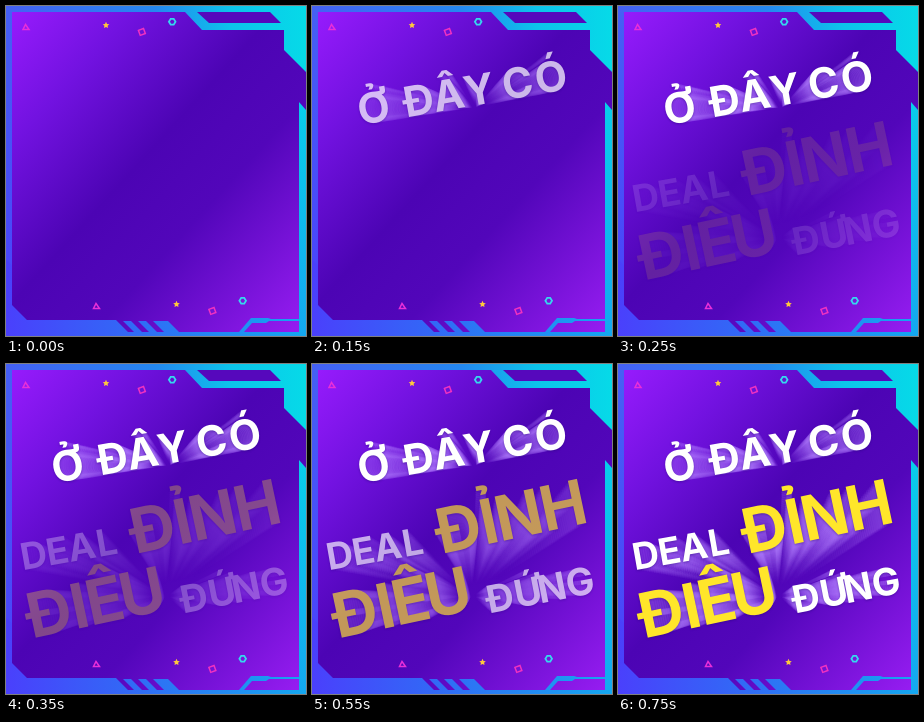
These frames come from a looping animation (300x330 px, 1450 ms). An HTML page:

```html
<!DOCTYPE html>
<html lang="vi">
<head>
<meta charset="utf-8">
<title>Deal</title>
<style>
html, body { margin: 0; width: 100%; height: 100%; overflow: hidden; background: #4a06b4; }
svg { display: block; width: 300px; height: 330px; }
text { font-family: Inter, "Noto Sans", sans-serif; font-weight: 700; text-anchor: middle; }
.face { filter: drop-shadow(0 1px 1px rgba(38, 4, 120, .45)); }
.block { opacity: 0; }
</style>
</head>
<body>
<svg viewBox="0 0 300 330">
  <defs>
    <linearGradient id="bg" x1="0" y1="0" x2="1" y2="1">
      <stop offset="0" stop-color="#9a1cff"/>
      <stop offset=".22" stop-color="#7212e0"/>
      <stop offset=".46" stop-color="#4c04b4"/>
      <stop offset=".64" stop-color="#5206ba"/>
      <stop offset="1" stop-color="#9a1ef4"/>
    </linearGradient>
    <linearGradient id="edge" gradientUnits="userSpaceOnUse" x1="0" y1="0" x2="300" y2="0">
      <stop offset="0" stop-color="#4560f4"/>
      <stop offset=".5" stop-color="#2488f0"/>
      <stop offset=".75" stop-color="#0cc4ea"/>
      <stop offset="1" stop-color="#06dae8"/>
    </linearGradient>
    <linearGradient id="side" gradientUnits="userSpaceOnUse" x1="0" y1="0" x2="0" y2="330">
      <stop offset="0" stop-color="#4560f4"/>
      <stop offset="1" stop-color="#4a40fc"/>
    </linearGradient>
    <linearGradient id="foot" gradientUnits="userSpaceOnUse" x1="0" y1="0" x2="300" y2="0">
      <stop offset="0" stop-color="#4a40fc"/>
      <stop offset=".4" stop-color="#3268f6"/>
      <stop offset="1" stop-color="#14a8f0"/>
    </linearGradient>
    <linearGradient id="right" gradientUnits="userSpaceOnUse" x1="0" y1="95" x2="0" y2="330">
      <stop offset="0" stop-color="#08cdea"/>
      <stop offset="1" stop-color="#14a8f0"/>
    </linearGradient>
    <g id="bits" fill="none" stroke-width="1.5">
      <path d="M19.5 18.5L23 23.5L17 23.5Z" stroke="#e82fd8"/>
      <path d="M100 15.8l1 2.1 2.3.3-1.7 1.6.4 2.3-2-1.1-2 1.1.4-2.3-1.7-1.6 2.3-.3z" fill="#ffc93c"/>
      <rect x="133.2" y="23.2" width="5.4" height="5.4" transform="rotate(-20 136 26)" stroke="#f032c0"/>
      <path d="M164.7 12.8h3l1.8 2.9-1.8 2.9h-3l-1.8-2.9z" stroke="#35d8ee" stroke-width="1.8"/>
    </g>
  </defs>

  <rect width="300" height="330" fill="url(#bg)"/>
  <path d="M0 0H6V330H0Z" fill="url(#side)"/>
  <path d="M0 0H300V66L278 44V24H196L179 6H0Z" fill="url(#edge)"/>
  <path d="M191 6H264L275 17H203Z" fill="#5608bc"/>
  <path d="M293 96L300 104V330H293Z" fill="url(#right)"/>
  <path d="M0 253L6 259V299L21 314H110L122 326H300V330H0Z" fill="url(#foot)"/>
  <g fill="url(#foot)">
    <path d="M117 315h8l11 11h-8z"/>
    <path d="M132 315h8l11 11h-8z"/>
    <path d="M147 315h15l11 11h-15z"/>
    <path d="M233 326L245 312H262L265 313H293V315H263L260 317H246L238 326Z"/>
  </g>
  <use href="#bits"/>
  <use href="#bits" x="70.5" y="279"/>
  <g id="stage"></g>
</svg>
<script>
const LOOP = 1450;
const WHITE = '#fff', YELLOW = '#ffe62a';

// word: text, baseline origin, tilt, size, colour, letter centres along the baseline
const blocks = [
  {
    eye: [163, 102], glow: .13,
    words: [
      ['Ở', 61.5, 117, -10, 42, WHITE, [3]],
      ['ĐÂY', 108.5, 109, -10, 42, WHITE, [0, 31, 62]],
      ['CÓ', 208, 91.5, -10, 42, WHITE, [0, 34]]
    ],
    steps: [[0, 0], [50, .24], [100, .48], [150, .72], [200, .94], [250, 1]]
  },
  {
    eye: [160, 232], glow: .12,
    words: [
      ['DEAL', 30, 204, -10, 37, WHITE, [0, 24, 48.5, 74]],
      ['ĐỈNH', 150, 185.5, -12, 62, YELLOW, [0, 32, 62.5, 108]],
      ['ĐIÊU', 46.5, 270, -12, 62, YELLOW, [0, 32, 58, 96]],
      ['ĐỨNG', 190, 247, -11, 38, WHITE, [0, 29, 53.5, 82]]
    ],
    steps: [[0, 0], [250, .13], [350, .3], [450, .48], [550, .66], [650, .83], [750, 1]]
  }
];

function add(parent, tag, attrs) {
  const el = document.createElementNS('http://www.w3.org/2000/svg', tag);
  for (const k in attrs) el.setAttribute(k, attrs[k]);
  return parent.appendChild(el);
}

function addWords(parent, words, tint) {
  for (const [str, x, y, tilt, size, color, xs] of words) {
    const el = add(parent, 'text', {
      x: xs.join(' '), y: 0, 'font-size': size, fill: tint || color,
      transform: `translate(${x} ${y}) rotate(${tilt})`
    });
    el.textContent = str;
  }
}

// Light beams: copies of the words shrinking towards a vanishing point.
function addBeams(parent, { words, eye: [x, y], glow }) {
  const n = 50;
  for (let i = n; i > 0; i--) {
    const p = i / n, s = 1 - .85 * p;
    const g = add(parent, 'g', {
      transform: `translate(${x} ${y}) scale(${s}) translate(${-x} ${-y})`,
      opacity: glow * (1 - p) ** 1.2
    });
    addWords(g, words, '#b584ff');
  }
}

const stage = document.getElementById('stage');
for (const b of blocks) {
  const g = add(stage, 'g', { class: 'block' });
  addBeams(g, b);
  addWords(add(g, 'g', { class: 'face' }), b.words);
  const frames = b.steps.map(([t, opacity]) => ({ offset: t / LOOP, opacity, easing: 'steps(1, end)' }));
  frames.push({ offset: 1, opacity: 1 });
  g.animate(frames, { duration: LOOP, iterations: Infinity });
}
</script>
</body>
</html>
```
